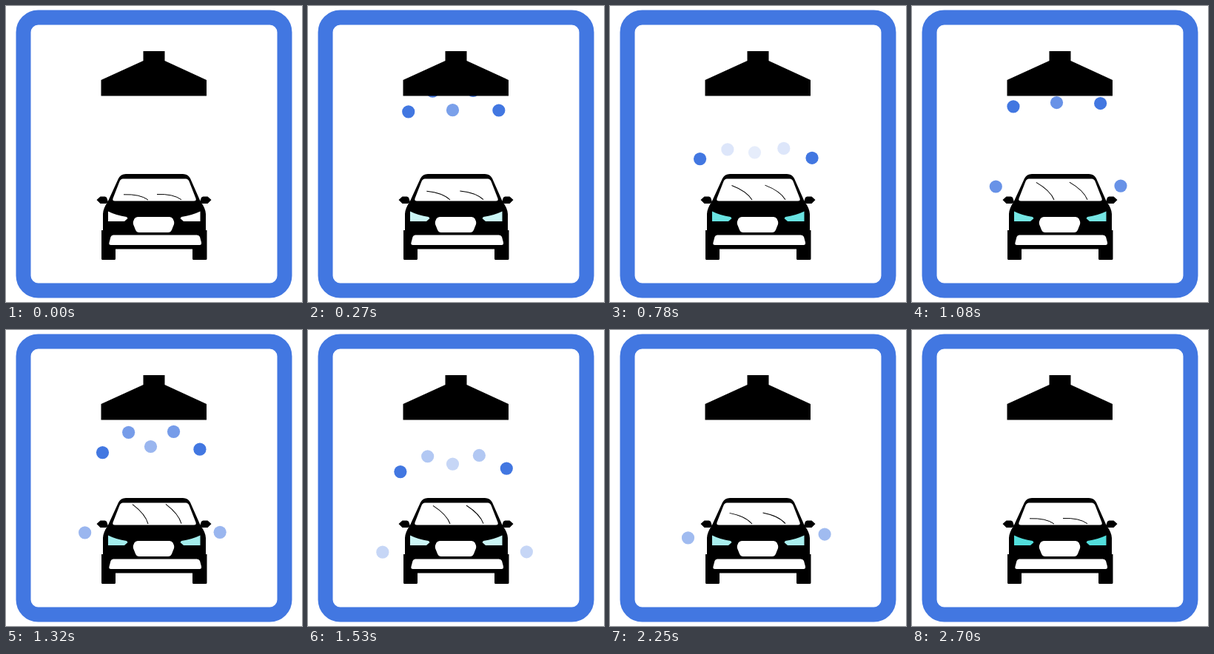
Write an HTML page that moves like this. It is 400 px wide and 400 px high and loops after 2730 ms.

```html
<!DOCTYPE html>
<html lang="en">
<head>
<meta charset="utf-8">
<title>Car wash</title>
<style>
  html, body { margin: 0; width: 100%; height: 100%; overflow: hidden; background: #fff; }
  svg { display: block; width: 100%; height: 100%; }
</style>
</head>
<body>
<svg viewBox="0 0 400 400">
  <rect x="23.5" y="15.5" width="353" height="369" rx="20" fill="#fff" stroke="#4277e1" stroke-width="20"/>
  <g id="drops" fill="#4277e1"></g>
  <path d="M185.5 61H214.5V74L271 100V121.5H128.5V100L185.5 74Z"/>

  <g id="car">
    <path d="M162 227H239Q246 227 249 233L262.500 263.500Q270 274 270 281V303H271.500V341.500Q271.500 343 270 343H253.500Q252 343 252 341.500V328.500H148V341.500Q148 343 146.500 343H130.500Q129 343 129 341.500V303H131V281Q131 274 138 263.500L152 233Q155 227 162 227Z"/>
    <path d="M122.500 262L127.500 257.500H133.500Q136 257.500 136.500 260L138 265L135 267H127.500Z"/>
    <path d="M277.500 262L272.500 257.500H266.500Q264 257.500 263.500 260L262 265L265 267H272.500Z"/>
    <g fill="#fff">
      <path d="M158 233.500H243Q246 233.500 247.500 237L256.500 260Q257.500 263.500 254 263.500H147Q143.500 263.500 144.500 260L153.500 237Q155 233.500 158 233.500Z"/>
      <path d="M178 285H221Q224 285 225.500 287.500L227 291Q227.500 293 227 295L224 302.500Q222.500 306 219 306H180Q176.500 306 175 302.500L172 295Q171.500 293 172 291L173.500 287.500Q175 285 178 285Z"/>
      <path d="M145 309.500H258Q261 309.500 262 312L264 319.500Q264.500 323 261.500 323H142Q138.500 323 139.500 319.500L141.500 312Q142.500 309.500 145 309.500Z"/>
    </g>
    <g id="lamps">
      <path d="M138 277.500Q149 283 163 285L164.500 287L160 291H138Z"/>
      <path d="M262.500 277.500Q251 283 237 285L235.500 287L240 291H262.500Z"/>
    </g>
    <g fill="none" stroke="#000" stroke-width="1">
      <path class="wiper" d="M159 254.800Q181 254 192 262"/>
      <path class="wiper" d="M204 254.500Q226 253.700 237 261.700"/>
    </g>
  </g>
</svg>
<script>
  const LOOP = 2730, STEP = 30, HALF = 900;
  const clamp = v => Math.max(0, Math.min(1, v));

  // Each drop: start time, position at start, speed in px per ms, fade start and length
  const drops = [];
  function addDrop(start, x, y, vx, vy, fadeAt, fadeLen, life) {
    const el = document.createElementNS("http://www.w3.org/2000/svg", "circle");
    el.setAttribute("r", 8.6);
    document.getElementById("drops").append(el);
    drops.push({ el, start, x, y, vx, vy, fadeAt, fadeLen, life });
  }

  // Outer pairs, one every half cycle
  addDrop(0, 143.2, 109.2, -0.0277, 0.1248, HALF, HALF, 2 * HALF);
  addDrop(0, 249.8, 107.0, 0.0298, 0.126, HALF, HALF, 2 * HALF);
  addDrop(HALF, 141.8, 113.5, -0.0269, 0.124, HALF, HALF, 2 * HALF);
  addDrop(HALF, 249.2, 109.3, 0.0303, 0.1235, HALF, HALF, 2 * HALF);

  // Middle three, two rounds
  for (const s of [0, HALF]) {
    addDrop(s, 195.5, 110.3, 0, 0.1124, 0, HALF, HALF);
    addDrop(s + 240, 169, 110.5, -0.0188, 0.1545, 0, 660, 660);
    addDrop(s + 240, 222.4, 109.8, 0.023, 0.153, 0, 660, 660);
  }

  const lamps = document.getElementById("lamps");
  const wipers = document.querySelectorAll(".wiper");
  const pivots = ["192 262", "237 261.7"];
  const lampRgb = [82, 222, 220];

  function draw(t) {
    for (const d of drops) {
      const p = t - d.start;
      const on = p >= 0 && p < d.life;
      d.el.setAttribute("opacity", on ? clamp(1 - (p - d.fadeAt) / d.fadeLen) : 0);
      d.el.setAttribute("cx", d.x + d.vx * p);
      d.el.setAttribute("cy", d.y + d.vy * p);
    }

    const glow = 1 - Math.abs(1 - (t % (2 * HALF)) / HALF);
    const rgb = lampRgb.map(c => Math.round(255 + (c - 255) * glow));
    lamps.setAttribute("fill", `rgb(${rgb})`);

    const angle = 40 * (1 - Math.abs(1 - t / 1350));
    wipers.forEach((w, i) => w.setAttribute("transform", `rotate(${Math.max(0, angle)} ${pivots[i]})`));
  }

  const origin = performance.now();
  function tick() {
    const t = (performance.now() - origin) % LOOP;
    draw(Math.floor(t / STEP) * STEP);
    requestAnimationFrame(tick);
  }
  draw(0);
  requestAnimationFrame(tick);
</script>
</body>
</html>
```
